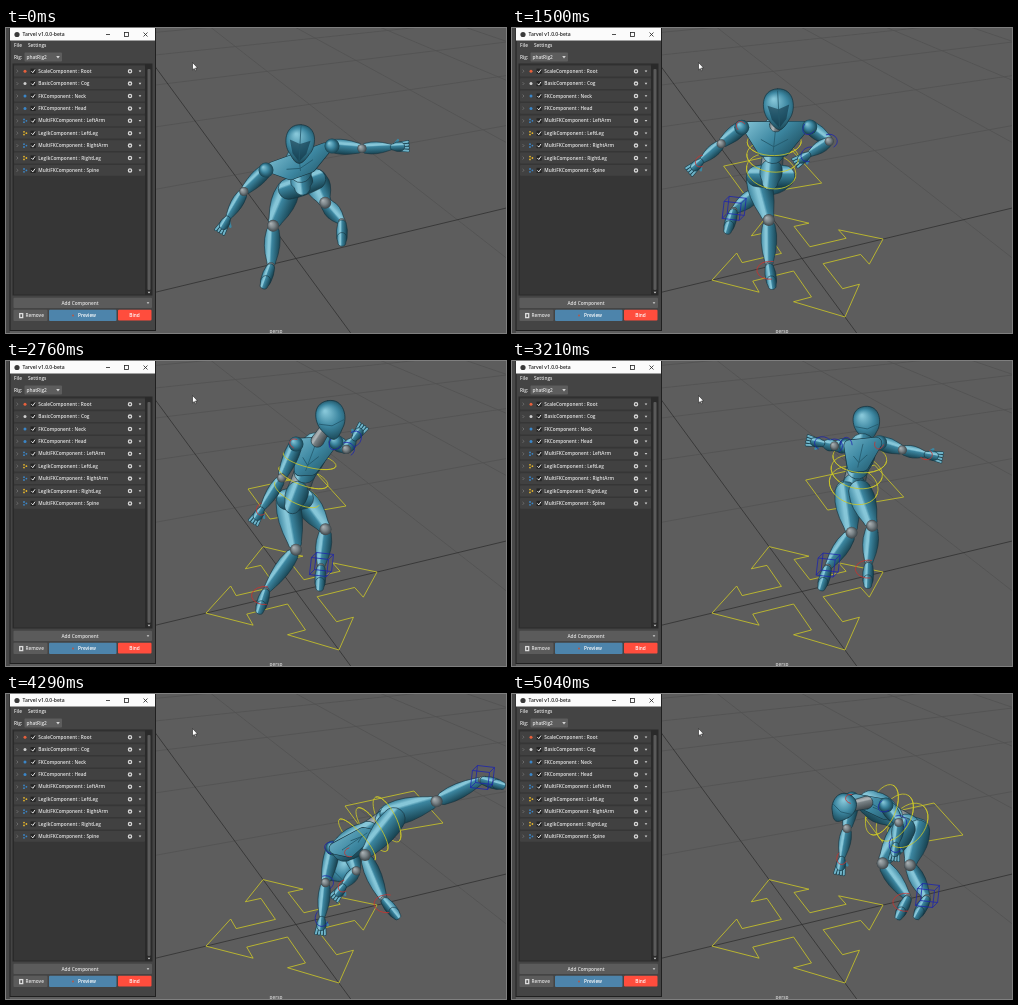
An HTML page with a canvas that plays this animation: 500 by 305 pixels, repeating every 5070 ms.

```html
<!DOCTYPE html>
<html lang="en">
<head>
<meta charset="utf-8">
<title>Rig preview</title>
<style>
html, body { margin: 0; width: 100%; height: 100%; overflow: hidden; background: #5d5d5d; }
canvas { display: block; width: 500px; height: 305px; }
</style>
</head>
<body>
<canvas id="stage" width="500" height="305"></canvas>
<script>
const W = 500, H = 305, LOOP = 5070, STEP = 30;
const YELLOW = '#cfca26', BLUE = '#1d25ad', RED = '#c9322e';
const TEAL = ['#17414f', '#3c86a0', '#86c6d8'], GREY = ['#3c4448', '#7a8387', '#a9b0b3'];
const stage = document.getElementById('stage');
const back = document.createElement('canvas');
back.width = W; back.height = H;
let c = back.getContext('2d');

// ---------- helpers ----------
const mix = (a, b, k) => a.map((v, i) => v + (b[i] - v) * k);
const add = (a, b, k = 1) => [a[0] + b[0] * k, a[1] + b[1] * k];
const dist = (a, b) => Math.hypot(b[0] - a[0], b[1] - a[1]);
const heading = (a, b) => Math.atan2(b[1] - a[1], b[0] - a[0]);
const polar = (ang, r) => [Math.cos(ang) * r, Math.sin(ang) * r];

function box(x, y, w, h, fill, r = 0) {
  c.fillStyle = fill;
  c.beginPath();
  c.roundRect(x, y, w, h, r);
  c.fill();
}
function dot(x, y, r, fill) {
  c.fillStyle = fill;
  c.beginPath();
  c.arc(x, y, r, 0, 7);
  c.fill();
}
function line(pts, color, width = 1, close = false) {
  c.strokeStyle = color;
  c.lineWidth = width;
  c.beginPath();
  pts.forEach(p => c.lineTo(p[0], p[1]));
  if (close) c.closePath();
  c.stroke();
}
function label(s, x, y, align = 'left', fill = '#e4e4e4', size = 4.75) {
  c.font = `600 ${size}px "Open Sans", "Noto Sans", sans-serif`;
  c.textAlign = align;
  c.textBaseline = 'middle';
  c.fillStyle = fill;
  c.fillText(s, x, y);
}

// floor plane to screen
function ground(u, v) {
  const d = 1 + 0.0526 * u - 0.1316 * v;
  return [290 + (85.3 * u + 37.3 * v) / d, 230.5 + (-20.5 * u + 50.8 * v) / d];
}

// ---------- static scenery ----------
function drawViewport() {
  const farU = [1912, -159], farV = [7, -155];
  const ray = (p, far, color) => line([far, mix(far, p, 6)], color, 0.8);
  box(0, 0, W, H, '#5d5d5d');
  for (let i = 6; i >= 0; i--) {
    const color = i ? '#525252' : '#303030';
    ray(ground(0, -2.1 * i), farU, color);
    ray(ground(2.1 * i, 0), farV, color);
  }
  label('persp', 270, 304, 'center', '#d0d0d0');
}

const kinds = { Scale: '#e8603c', Basic: '#cfcfcf', FK: '#3b86c8', MultiFK: '#3b86c8', LegIk: '#e5b52c' };
const rows = ['Scale Root', 'Basic Cog', 'FK Neck', 'FK Head', 'MultiFK LeftArm',
  'LegIk LeftLeg', 'MultiFK RightArm', 'LegIk RightLeg', 'MultiFK Spine'];
function arrowDown(x, y, r = 1.3) {
  c.fillStyle = '#d5d5d5';
  c.beginPath();
  c.moveTo(x - r, y - r * 0.6);
  c.lineTo(x + r, y - r * 0.6);
  c.lineTo(x, y + r * 0.8);
  c.fill();
}
function drawRow(row, i) {
  const [kind, part] = row.split(' '), y = 43.2 + i * 12.4, color = kinds[kind];
  box(8, y - 5.4, 131, 10.8, '#414141', 1);
  line([[10.6, y - 1.4], [12, y], [10.6, y + 1.4]], '#888', 0.6);
  if (i < 4) dot(19, y, 1.5, color);
  else for (let k = 0; k < 3; k++) dot(18.8 + 1.6 * Math.cos(k * 2.1), y + 1.6 * Math.sin(k * 2.1), 0.9, color);
  box(24.5, y - 2.6, 5.2, 5.2, '#242424');
  line([[25.4, y], [26.8, y + 1.5], [29, y - 1.7]], '#fff', 0.9);
  label(kind + 'Component : ' + part, 32.3, y + 0.3);
  c.strokeStyle = '#d8d8d8';
  c.lineWidth = 1.3;
  c.beginPath();
  c.arc(124, y, 1.6, 0, 7);
  c.stroke();
  arrowDown(134, y);
}
function drawPanel() {
  box(0, 0, 4, H, '#484848');
  box(3.5, 0, 146.5, 303, '#202020');
  box(4.5, 12, 144.5, 290, '#444');
  box(4, 0, 145, 12.5, '#fbfbfb');
  dot(11, 6.5, 2.6, '#3a3a3a');
  label('Tarvel v1.0.0-beta', 16.5, 6.8, 'left', '#222', 5);
  line([[100, 6.5], [104, 6.5]], '#222', 0.8);
  c.strokeRect(118.5, 4.5, 4, 4);
  line([[137.5, 4.5], [141.5, 8.5]], '#222', 0.8);
  line([[137.5, 8.5], [141.5, 4.5]], '#222', 0.8);
  label('File', 8, 17.8);
  label('Settings', 22, 17.8);
  label('Rig:', 8, 29.5);
  box(18.5, 24.5, 37.5, 9, '#5d5d5d', 1);
  label('phatRig2', 20.5, 29.5);
  arrowDown(52, 29, 1.8);
  box(6.5, 35.5, 140, 232, '#2a2a2a');
  box(8, 36.5, 131, 230, '#363636');
  rows.forEach(drawRow);
  box(141.5, 41, 3, 221, '#5a5a5a', 1);
  arrowDown(143, 264.5);
  box(7.5, 269.7, 138.5, 10.3, '#5b5b5b', 1);
  label('Add Component', 74, 275.4, 'center');
  arrowDown(142, 275);
  box(7.5, 281.7, 34, 11.3, '#5b5b5b', 1);
  c.strokeStyle = '#ddd';
  c.strokeRect(13.7, 285.6, 3, 4);
  label('Remove', 19.5, 287.8);
  box(43, 281.7, 67.5, 11.3, '#4d84ab', 1);
  dot(67, 287.4, 1, '#b05a4a');
  label('Preview', 81, 287.8, 'center', '#fff');
  box(112, 281.7, 33.5, 10.8, '#ff4d3d', 1);
  label('Bind', 128.5, 287.4, 'center', '#fff');
}
function drawCursor() {
  c.beginPath();
  [[0, 0], [0, 7.5], [1.8, 6], [3.2, 8.5], [4, 8], [3, 5.5], [5, 5.3]].forEach(p => c.lineTo(186.5 + p[0], 34.5 + p[1]));
  c.closePath();
  c.fillStyle = '#fff';
  c.fill();
  c.strokeStyle = '#222';
  c.lineWidth = 0.6;
  c.stroke();
}

// ---------- motion ----------
// Each key states only what moves; the rest carries over.
// turn: half shoulder line, right to left. Limbs: end point and sideways bend. toe: foot swing.
const keys = [];
function key(t, change) {
  keys.push({ ...keys[keys.length - 1], t, ...change });
}
key(0, { hip: [296, 156], neck: [293, 130], head: [294, 116], turn: [33, -12], toe: [-8],
  rArm: [222, 190, 4], lArm: [386, 119, 2], rLeg: [265, 238, 7], lLeg: [336, 194, 4] });
key(930, { hip: [264, 146], neck: [274, 97], head: [278, 79], turn: [33, -1],
  rArm: [192, 117, 0], lArm: [341, 113, -7], rLeg: [265, 238, -3], lLeg: [238, 188, 8] });
key(2100, { hip: [262, 150], neck: [263, 103], head: [266, 85], toe: [14],
  rArm: [200, 160, 1], lArm: [268, 133, -27], rLeg: [250, 236, -9], lLeg: [232, 182, -7] });
key(2760, { hip: [289, 138], neck: [310, 82], head: [325, 59], turn: [20, -1], toe: [0],
  rArm: [256, 148, -3], lArm: [348, 78, 9], rLeg: [260, 230, -20], lLeg: [315, 206, -14] });
key(3300, { hip: [350, 128], neck: [356, 86], head: [358, 68], turn: [-22, 2],
  rArm: [430, 90, 2], lArm: [304, 90, -3], rLeg: [372, 200, -6] });
key(3690, { hip: [374, 130], neck: [350, 116], head: [352, 125], toe: [-4],
  rArm: [340, 150, 0], lArm: [298, 168, 0], rLeg: [385, 208, -3], lLeg: [318, 202, 2] });
key(4290, { hip: [386, 122], neck: [336, 156], head: [333, 176], turn: [-9, -2], toe: [14],
  rArm: [338, 192, -9], lArm: [316, 224, 2], rLeg: [378, 206, 25], lLeg: [476, 86, 4] });
key(5040, { hip: [400, 134], neck: [357, 108], head: [331, 114], turn: [17, 3], toe: [-18],
  rArm: [330, 164, 0], lArm: [384, 150, -8], rLeg: [396, 204, 24], lLeg: [415, 204, 13] });

// smooth curve through the keys
function valueAt(t, name) {
  let i = 0;
  while (i < keys.length - 2 && t >= keys[i + 1].t) i++;
  const at = j => keys[Math.min(Math.max(j, 0), keys.length - 1)];
  const a = at(i), b = at(i + 1), d = b.t - a.t, k = Math.min((t - a.t) / d, 1);
  const ease = k * k * (3 - 2 * k), out = k * (1 - k) ** 2, into = k * k * (k - 1);
  const slope = (j, n) => {
    const p = at(j - 1), q = at(j + 1);
    return p === at(j) || q === at(j) ? 0 : (q[name][n] - p[name][n]) / (q.t - p.t);
  };
  return a[name].map((v, n) => v + (b[name][n] - v) * ease + d * (out * slope(i, n) + into * slope(i + 1, n)));
}
function chain(root, [x, y, bend]) {
  const end = [x, y];
  return { root, end, mid: add(mix(root, end, 0.5), polar(heading(root, end) + Math.PI / 2, bend)) };
}
function bodyAt(t) {
  const p = {};
  Object.keys(keys[0]).filter(n => n !== 't').forEach(n => p[n] = valueAt(t, n));
  [['r', -1], ['l', 1]].forEach(([s, sign]) => {
    const arm = p[s + 'Arm'] = chain(add(p.neck, p.turn, sign), p[s + 'Arm']);
    arm.tip = add(arm.end, polar(heading(arm.mid, arm.end), 18));
    const leg = p[s + 'Leg'] = chain(add(p.hip, p.turn, sign * 0.4), p[s + 'Leg']);
    const toe = add([p.toe[0], 12], polar(heading(leg.mid, leg.end), 12));
    leg.tip = add(leg.end, polar(heading([0, 0], toe), 24));
  });
  return p;
}

// ---------- body ----------
function limb(a, b, w0, w1, w2, tone = TEAL) {
  const ang = heading(a, b), n = dist(a, b), w = Math.max(w0, w1 * 0.85);
  const lit = 0.5 * Math.sin(ang) - 0.85 * Math.cos(ang), hi = 0.5 + 0.22 * lit;
  const g = c.createLinearGradient(0, -w, 0, w);
  g.addColorStop(0, lit < 0 ? tone[1] : tone[0]);
  g.addColorStop(hi - 0.1, lit < 0 ? tone[2] : tone[1]);
  g.addColorStop(hi, tone[2]);
  g.addColorStop(hi + 0.1, lit < 0 ? tone[1] : tone[2]);
  g.addColorStop(1, lit < 0 ? tone[0] : tone[1]);
  c.save();
  c.translate(a[0], a[1]);
  c.rotate(ang);
  c.beginPath();
  c.moveTo(0, -w0);
  c.quadraticCurveTo(n * 0.4, -w1, n, -w2);
  c.arc(n, 0, w2, -Math.PI / 2, Math.PI / 2);
  c.quadraticCurveTo(n * 0.4, w1, 0, w0);
  c.arc(0, 0, w0, Math.PI / 2, Math.PI * 1.5);
  c.fillStyle = g;
  c.fill();
  c.strokeStyle = '#17343f';
  c.lineWidth = 0.6;
  c.stroke();
  c.restore();
}
function ball([x, y], r, tone = GREY) {
  const g = c.createRadialGradient(x - r * 0.4, y - r * 0.4, 0.3, x, y, r);
  tone.forEach((color, i) => g.addColorStop(1 - i / 2, color));
  dot(x, y, r, g);
}
function drawArm({ root, mid, end, tip }) {
  limb(mix(root, mid, 0.12), mix(root, mid, 0.85), 7, 8.5, 5.2);
  limb(mix(mid, end, 0.15), mix(mid, end, 0.9), 5.2, 7.5, 3.4);
  ball(mid, 4.6);
  ball(root, 7.5, TEAL);
  const a = heading(end, tip), palm = mix(end, tip, 0.45);
  c.lineCap = 'round';
  for (let i = -1.5; i < 2; i++) {
    const from = add(palm, polar(a + Math.PI / 2, i * 2.2)), to = add(from, polar(a + i * 0.1, 8));
    line([from, to], TEAL[0], 3.2);
    line([from, to], '#6fb3c8', 2);
  }
  line([end, add(end, polar(a - 0.8, 9))], TEAL[1], 2.6);
  limb(mix(end, palm, 0.2), palm, 3.4, 5.2, 4.6);
}
function drawLeg({ root, mid, end, tip }) {
  limb(mix(root, mid, 0.06), mix(root, mid, 0.86), 11.5, 14.5, 6.8);
  limb(mix(mid, end, 0.16), mix(mid, end, 0.92), 6.6, 10, 4.2);
  ball(mid, 6);
  ball(end, 3.8);
  limb(mix(end, tip, 0.1), mix(end, tip, 0.62), 4.4, 6, 5.2);
  limb(mix(end, tip, 0.64), mix(end, tip, 0.84), 4.8, 5.2, 4);
}
function drawTorso({ neck, hip, turn, rArm, lArm, rLeg, lLeg }) {
  const spine = k => mix(neck, hip, k);
  limb(spine(0.4), spine(0.9), 11, 10, 11, GREY);
  limb(rLeg.root, lLeg.root, 10.5, 12.5, 10.5);
  limb(spine(0.88), mix(neck, hip, 1.12), 11, 12, 8);
  limb(spine(0.05), spine(0.52), 13, 17, 11);
  const r = mix(rArm.root, neck, 0.2), l = mix(lArm.root, neck, 0.2);
  const chest = [r, l, add(spine(0.48), turn, 0.3), add(spine(0.48), turn, -0.3)];
  const g = c.createLinearGradient(neck[0] - 26, neck[1] - 14, neck[0] + 22, neck[1] + 36);
  [...TEAL].reverse().forEach((color, i) => g.addColorStop(i / 2, color));
  c.lineJoin = 'round';
  line(chest, '#17343f', 12, true);
  line(chest, g, 10.8, true);
  c.fillStyle = g;
  c.fill();
  line([neck, spine(0.5)], '#245a6d', 0.8);
  line([mix(r, spine(0.5), 0.5), spine(0.4), mix(l, spine(0.5), 0.5)], '#245a6d', 0.9);
}
function drawHead({ head, neck, hip }, faced) {
  const lean = Math.atan2(neck[0] - hip[0], hip[1] - neck[1]);
  const size = 1 - Math.max(0, hip[0] - 270) / 600, rx = 14.5 * size, ry = 20.5 * size ** 1.3;
  limb(mix(neck, head, 0.1), mix(neck, head, 0.8), 6.5, 5.5, 5.5, GREY);
  c.save();
  c.translate(head[0], head[1]);
  c.rotate(-lean / 2);
  c.beginPath();
  c.moveTo(0, -ry);
  for (const s of [1, -1]) {
    const ends = [[s * rx * 0.72, ry * 0.5], [0, s * ry]];
    if (s > 0) {
      c.bezierCurveTo(rx * 1.25, -ry, rx * 1.2, ry * 0.1, ...ends[0]);
      c.quadraticCurveTo(rx * 0.3, ry, 0, ry);
    } else {
      c.quadraticCurveTo(-rx * 0.3, ry, ...ends[0]);
      c.bezierCurveTo(-rx * 1.2, ry * 0.1, -rx * 1.25, -ry, ...ends[1]);
    }
  }
  const g = c.createRadialGradient(-rx * 0.3, -ry * 0.5, 1, 0, 0, ry * 1.1);
  TEAL.forEach((color, i) => g.addColorStop(1 - i / 2, color));
  c.fillStyle = g;
  c.fill();
  c.strokeStyle = '#17343f';
  c.lineWidth = 0.7;
  c.stroke();
  if (faced) {
    c.fillStyle = 'rgba(16,52,68,.6)';
    c.beginPath();
    [[-0.75, -0.2], [0, 0], [0.75, -0.2], [0.5, 0.5], [0, 0.9], [-0.5, 0.5]].forEach(q => c.lineTo(q[0] * rx, q[1] * ry));
    c.fill();
    line([[0, -ry * 0.9], [0, ry * 0.85]], '#245a6d', 0.8);
  } else line([[-rx * 0.9, ry * 0.1], [0, ry * 0.3], [rx * 0.9, ry * 0.1]], '#245a6d', 0.8);
  c.restore();
}
function drawBody(p, t) {
  const parts = {
    A: () => drawArm(p.lArm), a: () => drawArm(p.rArm), L: () => drawLeg(p.lLeg), l: () => drawLeg(p.rLeg),
    T: () => drawTorso(p), H: () => drawHead(p, t < 2450)
  };
  const order = t < 3200 ? 'LlTAaH' : t < 4600 ? 'HaATLl' : 'aTLlAH';
  for (const k of order) parts[k]();
}

// ---------- rig controls ----------
function ring([x, y], rx, ry, ang, color, a0 = 0, a1 = Math.PI * 2) {
  c.strokeStyle = color;
  c.lineWidth = 0.8;
  c.beginPath();
  c.ellipse(x, y, rx, ry, ang, a0, a1);
  c.stroke();
}
function drawMainControl() {
  const arrow = [[0.17, -0.17], [0.62, -0.17], [0.62, -0.36], [1, 0], [0.62, 0.36], [0.62, 0.17]];
  const pts = [];
  for (let i = 0; i < 4; i++) {
    const [k, s] = polar(i * Math.PI / 2, 1);
    arrow.forEach(([u, v]) => pts.push(ground(u * k - v * s, u * s + v * k)));
  }
  line(pts, YELLOW, 0.8, true);
}
function spineRings({ neck, hip }, a1) {
  const tilt = heading(neck, hip) - Math.PI / 2;
  const ry = 27 * Math.sqrt(Math.max(0.1, 1 - (dist(neck, hip) / 64) ** 2));
  for (let i = 0; i < 3; i++)
    ring(mix(neck, hip, 0.3 + i * 0.3), 27 - i, ry * (0.8 + i * 0.1), tilt + (i - 1) * 0.12, YELLOW, 0, a1);
}
function drawBackControls(p) {
  const corners = [[-47, -10], [22, -25], [51, 7], [-25, 20]];
  line(corners.map(q => add(p.hip, q)), YELLOW, 0.8, true);
  spineRings(p, Math.PI * 2);
}
function cube(at, r) {
  const face = d => [0, 1, 2, 3].map(i => add(add(at, [d, -d]), polar(i * Math.PI / 2 + 0.9, r * 1.35)));
  const near = face(-2), far = face(3);
  line(near, BLUE, 0.8, true);
  line(far, BLUE, 0.8, true);
  near.forEach((q, i) => line([q, far[i]], BLUE, 0.8));
}
function drawFrontControls(p) {
  spineRings(p, Math.PI);
  for (const [arm, color, r] of [[p.lArm, BLUE, 8.5], [p.rArm, RED, 6.5]]) {
    ring(arm.root, r, r * 0.7, heading(arm.root, arm.mid) + 1.57, color, -1.5, 1.5);
    ring(arm.end, r, r * 0.8, heading(arm.mid, arm.end), color, -1.2, 2.4);
  }
  ring(p.lArm.mid, 8, 7, 0, BLUE, -2, 1);
  ring(mix(p.rLeg.end, p.rLeg.tip, 0.2), 13, 9, 0, RED, 1.4, 5);
  cube(add(p.lLeg.end, [0, -2]), 9);
}

// ---------- playback ----------
drawViewport();
drawPanel();
c = stage.getContext('2d');
const start = performance.now();
function frame() {
  const t = Math.floor(((performance.now() - start) % LOOP) / STEP) * STEP;
  const p = bodyAt(t), rigged = t >= STEP;
  c.lineCap = 'butt';
  c.lineJoin = 'miter';
  c.drawImage(back, 0, 0);
  if (rigged) {
    drawMainControl();
    drawBackControls(p);
  }
  drawBody(p, t);
  c.lineCap = 'butt';
  if (rigged) drawFrontControls(p);
  drawCursor();
  requestAnimationFrame(frame);
}
frame();
</script>
</body>
</html>
```
